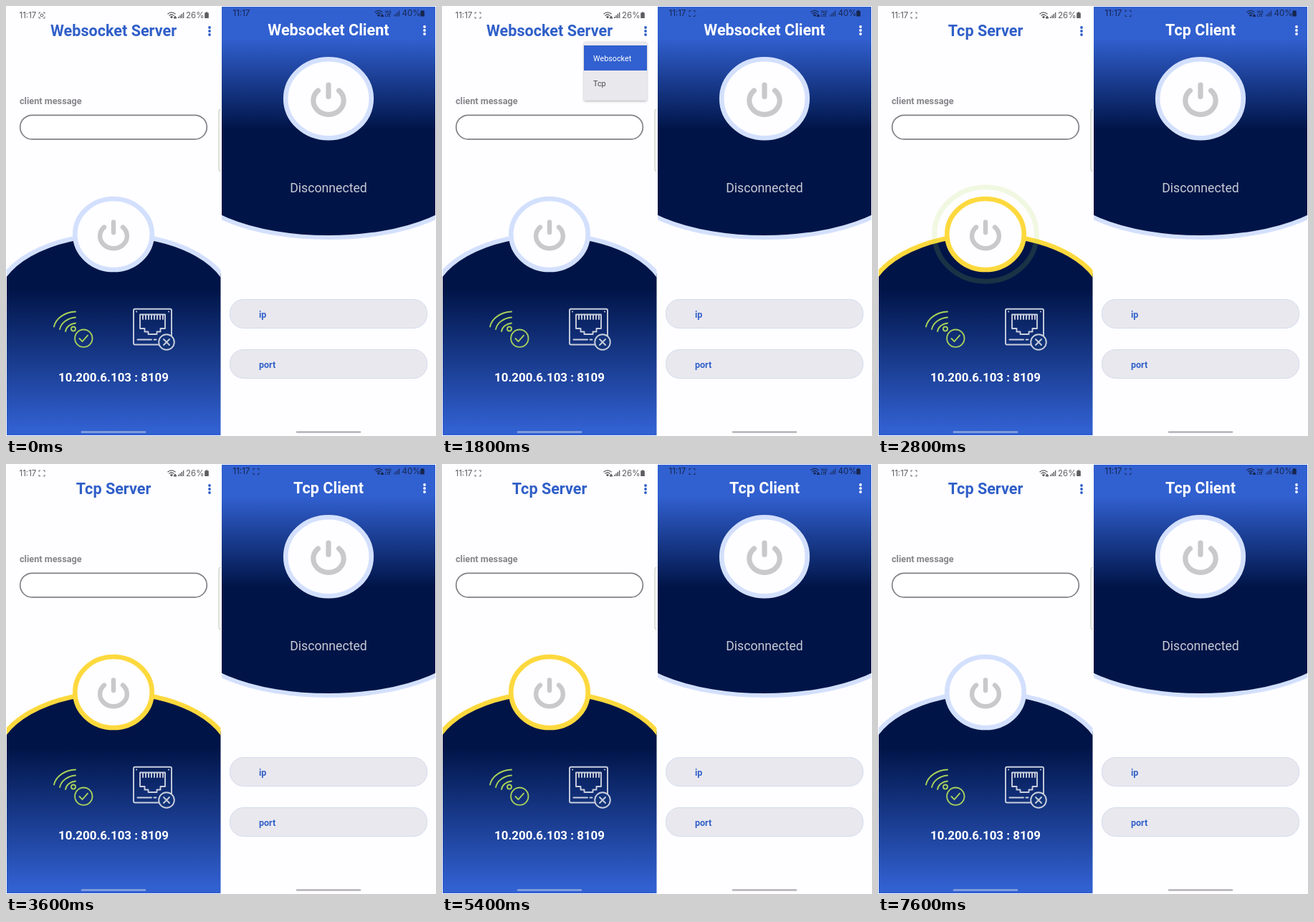
Write an HTML page that moves like this. It is 600x600 px and loops after 8 s.

```html
<!DOCTYPE html>
<html lang="en">
<head>
<meta charset="utf-8">
<title>Server and client</title>
<style>
  html, body { margin: 0; width: 100%; height: 100%; overflow: hidden; background: #fff; }
  svg { display: block; width: 100%; height: 100%; }
  text { font-family: Roboto, Arial, sans-serif; }
  .bold { font-weight: 700; }
  .title { font-weight: 700; font-size: 21.6px; text-anchor: middle; }
  .status { font: 11.5px Inter, sans-serif; }
  .line { fill: none; stroke-width: 1.9; stroke-linecap: round; stroke-linejoin: round; }
</style>
</head>
<body>
<svg viewBox="0 0 600 600">
  <defs>
    <linearGradient id="domeFill" gradientUnits="userSpaceOnUse" x1="0" y1="395" x2="0" y2="590">
      <stop stop-color="#001447"/><stop offset="1" stop-color="#3160d0"/>
    </linearGradient>
    <linearGradient id="headerFill" gradientUnits="userSpaceOnUse" x1="0" y1="45" x2="0" y2="172">
      <stop stop-color="#3160d0"/><stop offset="1" stop-color="#001447"/>
    </linearGradient>
    <clipPath id="leftScreen"><path d="M1 1H299.5V599H1Z"/></clipPath>
    <clipPath id="rightScreen"><path d="M301 1H599V599H301Z"/></clipPath>
    <filter id="shadow" x="-10%" y="-10%" width="120%" height="125%">
      <feDropShadow dx="0" dy="1.5" stdDeviation="1.6" flood-opacity=".3"/>
    </filter>
    <g id="power" fill="none" stroke="#c9c9cc" stroke-width="7.2" stroke-linecap="round">
      <path d="M-14.6-14A21.2 19.3 0 1 0 14.6-14M0-22V-5.5"/>
    </g>
    <g id="dots"><circle cy="-5" r="1.9"/><circle r="1.9"/><circle cy="5" r="1.9"/></g>
    <path id="corners" d="M-4-1.8V-4H-1.8M1.8-4H4V-1.8M4 1.8V4H1.8M-1.8 4H-4V1.8" fill="none" stroke-width=".9"/>
    <g id="signals">
      <path d="M-5.5-1.8Q0-6.5 5.5-1.8M-3.6.6Q0-2.6 3.6.6" fill="none" stroke-width="1.2"/>
      <path d="M-1.7 2.2Q0 .6 1.7 2.2L0 4ZM3 4l2-3 2 3Z"/>
    </g>
    <path id="bars" d="M0 4V2H1.4V4ZM2.3 4V0H3.7V4ZM4.6 4V-2H6V4ZM6.9 4V-4H8.3V4Z"/>
    <path id="battery" d="M-1.4-4.6H1.4V-3.6H2.8V4H-2.8V-3.6H-1.4Z"/>
  </defs>

  <g clip-path="url(#leftScreen)">
    <path d="M0 0H300V600H0Z" fill="#fefdff"/>
    <rect x="297" y="144" width="8" height="87" rx="3" fill="#fff" stroke="#c1c5b6"/>
    <g fill="#5c5c61" stroke="none">
      <text class="status" x="18.5" y="17">11:17</text>
      <text class="status" x="251" y="17">26%</text>
      <use href="#signals" x="231" y="13" stroke="#5c5c61"/>
      <use href="#bars" x="240" y="13"/>
      <use href="#battery" x="280" y="13"/>
      <use href="#corners" x="50" y="13" stroke="#5c5c61"/>
      <circle id="serverLens" cx="50" cy="13" r="1.9" fill="none" stroke="#5c5c61"/>
    </g>
    <text id="serverTitle" class="title" x="150" y="42" fill="#2f5fc8"></text>
    <use href="#dots" x="284" y="35" fill="#2f5fc8"/>
    <text class="bold" x="19" y="136.5" font-size="12.7" fill="#858589">client message</text>
    <rect x="19.7" y="152.3" width="260.6" height="33.6" rx="16.8" fill="#fff" stroke="#818186" stroke-width="1.7"/>

    <path id="dome" d="M-15 610V413A165 94 0 0 1 315 413V610Z" fill="url(#domeFill)" stroke-width="6.5"/>
    <ellipse id="pulse" cx="150" cy="318.5" fill="none" stroke="#a9dc3c" stroke-width="7"/>
    <ellipse id="serverButton" cx="150" cy="318.5" rx="53.7" ry="49.5" fill="#fefdff" stroke-width="6.6"/>
    <use href="#power" transform="translate(150 321) scale(.89)"/>

    <g class="line" stroke="#a6cf5a">
      <path d="M67 447.5A32 25 0 0 1 97 426.5M75 451A25 20 0 0 1 97 434.5M83 454A16 13 0 0 1 97 442.5"/>
      <circle cx="94" cy="450.5" r="3"/>
      <circle cx="108.3" cy="463.7" r="12.2"/>
      <path d="M102.5 464l4 4.2 7.5-8.6"/>
    </g>
    <g class="line" stroke="#c9cfdd">
      <rect x="178" y="422.7" width="53" height="49.8" rx="2"/>
      <path d="M187 430.5H222V450H215.5V454.5H210.5V458H198.5V454.5H193.5V450H187ZM191 431v6m4-6v6m4-6v6m4-6v6m4-6v6m4-6v6m4-6v6m4-6v6"/>
      <path d="M183.5 465.5H203M206.5 465.5h3M182 426.5h.1M227 426.5h.1"/>
      <circle cx="224" cy="469" r="10.8" fill="#133479"/>
      <path d="M220 465l8 8m0-8l-8 8"/>
    </g>
    <text class="bold" x="150" y="523.8" font-size="16.9" fill="#fff" text-anchor="middle">10.200.6.103 : 8109</text>
    <path d="M106 594.5H194" stroke="#8ba4df" stroke-width="2.6" stroke-linecap="round"/>
  </g>

  <g clip-path="url(#rightScreen)">
    <path d="M300 0H600V600H300Z" fill="#fefdff"/>
    <path d="M250-10V239A200 84 0 0 0 650 239V-10Z" fill="url(#headerFill)" stroke="#d3e0fd" stroke-width="6"/>
    <g fill="#17264f">
      <text class="status" x="316.5" y="14.2">11:17</text>
      <text class="status" x="552.5" y="14.2">40%</text>
      <use href="#signals" x="520" y="10.5" stroke="#17264f"/>
      <text x="529" y="10" font-size="4.6" class="bold">Vo))</text>
      <text x="529" y="14.5" font-size="4.6" class="bold">LTE</text>
      <use href="#bars" x="541" y="10.5" opacity=".75"/>
      <use href="#battery" x="581" y="10.5"/>
      <g id="clientCapture" stroke="#17264f"><use href="#corners" x="349" y="10.5"/></g>
      <circle id="clientLens" cx="349" cy="10.5" r="1.9" fill="none" stroke="#17264f"/>
    </g>
    <text id="clientTitle" class="title" x="450" y="41" fill="#fff"></text>
    <use href="#dots" x="584" y="34" fill="#fff"/>
    <ellipse cx="450" cy="129.3" rx="59.8" ry="55" fill="#fefdff" stroke="#d3e0fd" stroke-width="6.6"/>
    <use href="#power" x="450" y="132"/>
    <text x="450" y="260" font-size="17.7" fill="#c6cad5" text-anchor="middle">Disconnected</text>
    <g fill="#e9e8ee" stroke="#d2dbee">
      <rect x="312.5" y="409.5" width="275" height="40" rx="19"/>
      <rect x="312.5" y="479.5" width="275" height="40" rx="19"/>
    </g>
    <g class="bold" font-size="12.5" fill="#3160c8">
      <text x="353" y="434.7">ip</text>
      <text x="353" y="504.7">port</text>
    </g>
    <path d="M406 594.5H494" stroke="#b5b3b8" stroke-width="2.6" stroke-linecap="round"/>
  </g>

  <g id="serverMenu" transform="translate(198 49.5)"></g>
  <g id="clientMenu" transform="translate(498 48.5)"></g>
</svg>

<script>
const LOOP = 8000, STEP = 200;
const MODES = ["Websocket", "Tcp"];
const PULSE = { start: 2435, period: 2177, duration: 500 };
const $ = id => document.getElementById(id);
const show = (id, on) => $(id).setAttribute("visibility", on ? "visible" : "hidden");
const setAttrs = (id, attrs) => {
  for (const name in attrs) $(id).setAttribute(name, attrs[name]);
};
const during = (t, from, to) => t >= from && t < to;

function drawMenu(id, selected, pressed) {
  const spot = pressed ? '<circle cx="38" cy="58" r="15" fill="#2450b8" opacity=".3"/>' : "";
  $(id).innerHTML =
    '<rect width="88" height="82" rx="2" fill="#e9e8ed" filter="url(#shadow)"/>' +
    `<rect y="${5.5 + 35 * selected}" width="88" height="35" fill="#3160d0"/>` + spot +
    MODES.map((name, i) =>
      `<text x="13" y="${27.3 + 34.7 * i}" font-size="10.8" fill="${i === selected ? "#fff" : "#48484c"}">${name}</text>`
    ).join("");
}

function drawPulse(t, active) {
  const progress = ((t - PULSE.start) % PULSE.period) / PULSE.duration;
  const visible = active && progress >= 0 && progress < 1;
  show("pulse", visible);
  if (!visible) return;
  const rx = 53.7 + 24 * progress;
  setAttrs("pulse", { rx, ry: rx * .922, opacity: .55 * (1 - progress) });
}

function render(t) {
  const serverMode = t >= 2200 ? 1 : 0;
  const clientMode = t >= 2600 ? 1 : 0;
  const active = during(t, 2200, 7400);
  const accent = active ? "#fdd93e" : "#d3e0fd";

  $("serverTitle").textContent = MODES[serverMode] + " Server";
  $("clientTitle").textContent = MODES[clientMode] + " Client";
  setAttrs("dome", { stroke: accent });
  setAttrs("serverButton", { stroke: accent });
  drawPulse(t, active);

  show("serverLens", t < 1800);
  show("clientCapture", t >= 600);
  show("clientLens", during(t, 600, 1800));

  drawMenu("serverMenu", serverMode, serverMode);
  drawMenu("clientMenu", clientMode, clientMode);
  show("serverMenu", during(t, 1600, 2600));
  show("clientMenu", during(t, 2000, 2800));
}

const began = performance.now();
function tick() {
  const t = (performance.now() - began) % LOOP;
  render(Math.floor(t / STEP) * STEP);
  requestAnimationFrame(tick);
}
tick();
</script>
</body>
</html>
```
